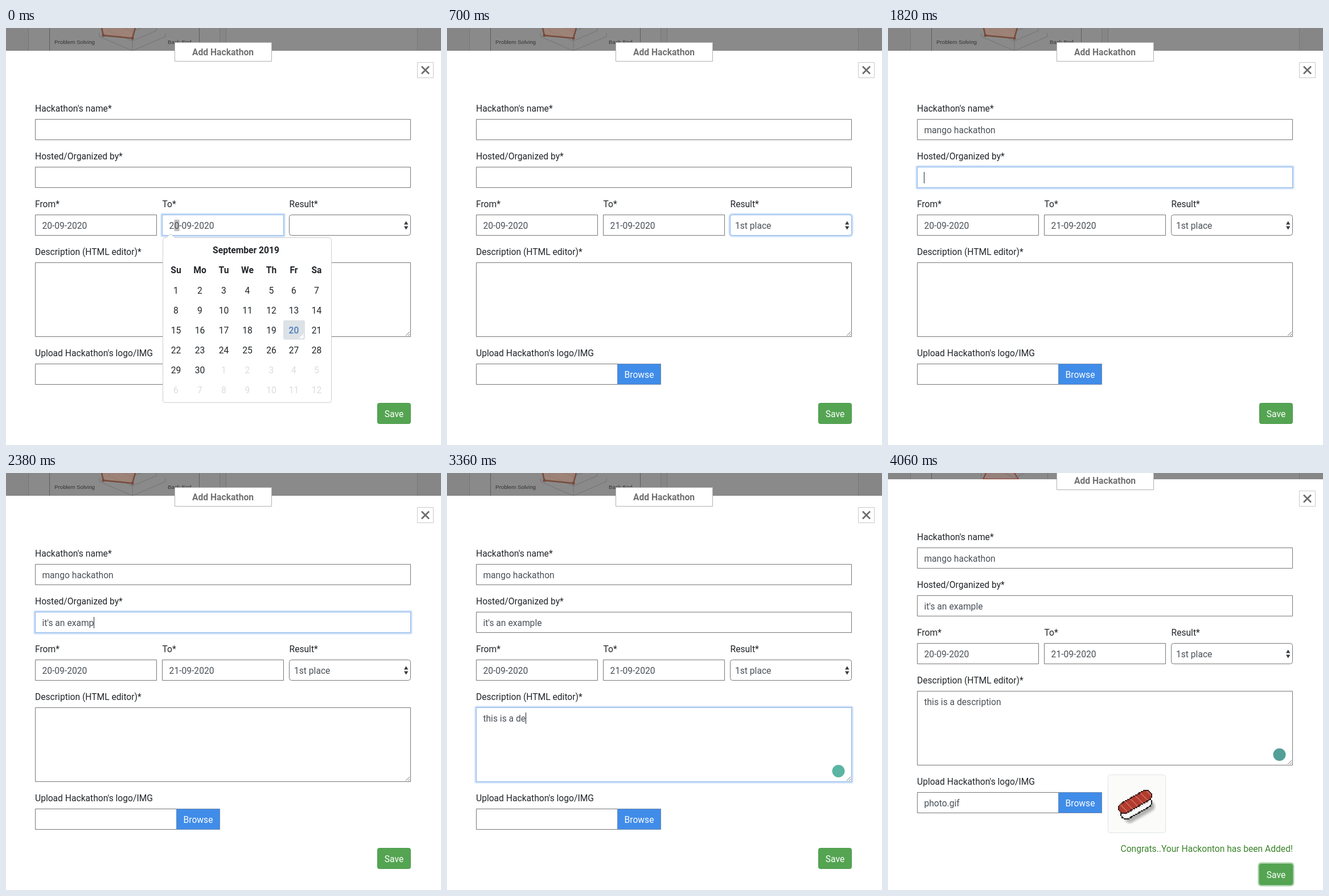
Animation of 764x733 px, one loop 4.54 s. Source, as an HTML page with a canvas:

```html
<!DOCTYPE html>
<html lang="en">
<head>
<meta charset="utf-8">
<title>Add Hackathon</title>
<style>
  html, body { margin: 0; width: 100%; height: 100%; overflow: hidden; background: #fff; }
  canvas { display: block; }
</style>
</head>
<body>
<canvas id="stage" width="764" height="733"></canvas>
<script>
const ctx = document.getElementById('stage').getContext('2d');
const LOOP = 4540, STEP = 140;
const INK = '#212529', MUTED = '#495057', BORDER = '#777';
const FONT = '15.63px Roboto, sans-serif', BOLD = '700 ' + FONT;

// y is the vertical middle of the capitals
function text(str, x, y, color = INK, align = 'left', font = FONT) {
  ctx.font = font;
  ctx.textAlign = align;
  ctx.fillStyle = color;
  ctx.fillText(str, x, y + 5.6);
}

function box(x, y, w, h, fill, stroke, radius = 0) {
  ctx.beginPath();
  ctx.roundRect(x + .5, y + .5, w - 1, h - 1, radius);
  if (fill) { ctx.fillStyle = fill; ctx.fill(); }
  if (stroke) { ctx.strokeStyle = stroke; ctx.lineWidth = 1; ctx.stroke(); }
}

function path(points, stroke, width = 1, fill) {
  ctx.beginPath();
  for (let i = 0; i < points.length; i += 2) ctx.lineTo(points[i], points[i + 1]);
  if (fill) { ctx.fillStyle = fill; ctx.fill(); }
  if (stroke) { ctx.strokeStyle = stroke; ctx.lineWidth = width; ctx.stroke(); }
}

function dot(x, y, r, color) {
  ctx.beginPath();
  ctx.arc(x, y, r, 0, 7);
  ctx.fillStyle = color;
  ctx.fill();
}

function field(x, y, w, h, focused, radius = 0) {
  if (focused) box(x - 3, y - 3, w + 6, h + 6, '#cbdff9', null, radius + 3);
  box(x, y, w, h, '#fff', focused ? '#8bb5e8' : BORDER, radius);
}

function input(x, y, w, h, value, focused, caret) {
  field(x, y, w, h, focused);
  text(value, x + 12.4, y + 19, MUTED);
  if (caret) {
    ctx.fillStyle = INK;
    ctx.fillRect(Math.round(x + 12.4 + ctx.measureText(value).width), y + 9, 1, 20);
  }
}

function backdrop(saved) {
  ctx.fillStyle = '#868686';
  ctx.fillRect(0, 0, 764, 41);
  for (const x of [39, 386]) box(x, -5, 337, 60, '#8a8a8a', '#767676');
  path([76.5, 0, 76.5, 41], '#5c5c5c');
  path([339.5, 0, 339.5, 41], '#5c5c5c');
  const web = '#737373';
  if (saved) {
    path([163.5, 0, 163.5, 11], web);
    path([280.5, 0, 280.5, 11], web);
    path([172, 0, 167, 11, 229, 11, 222, 0], '#8f4038', 2, '#95807b');
    path([205, 0, 222, 9, 240, 0], web);
    return;
  }
  for (const k of [1, .72, .45]) {
    path([222 - 58 * k, -21 + 30 * k, 222 - 58 * k, -21 + 36 * k, 222, -21 + 61 * k,
          222 + 58 * k, -21 + 36 * k, 222 + 58 * k, -21 + 30 * k], web);
  }
  path([222, 0, 222, 40], web);
  path([168, 0, 171, 13, 222, 18, 227, 0], '#764b3c', 2.5, 'rgba(170,125,108,.6)');
  dot(171, 13, 2.6, '#764b3c');
  dot(222, 18, 2.6, '#764b3c');
  const small = '9.75px "Liberation Sans", Arial, sans-serif';
  text('Problem Solving', 85, 22, '#333', 'left', small);
  text('Back End', 284, 22, '#333', 'left', small);
}

function calendar(day) {
  path([281, 368.5, 289, 362, 297, 368.5], '#ccc', 1, '#fff');
  box(275, 368, 297, 291, '#fff', '#cfcfcf', 4);
  path([282, 369, 296, 369], '#fff', 2);
  text('September 2019', 421.5, 390.5, INK, 'center', BOLD);
  const columns = [298.5, 340.5, 382.5, 424, 466, 505.5, 545.5];
  'Su Mo Tu We Th Fr Sa'.split(' ').forEach((name, i) =>
    text(name, columns[i], 425.5, INK, 'center', BOLD));
  for (let i = 0; i < 42; i++) {
    const x = columns[i % 7], y = 461 + 35.15 * Math.floor(i / 7), n = i + 1;
    if (n === day) {
      box(x - 19, y - 18, 39, 35, '#dde2e7', null, 3);
      path([x + 17, y + 6, x + 17, y + 14, x + 9, y + 14], null, 1, '#fff');
    }
    text(n > 30 ? n - 30 : n, x, y, n > 30 ? '#dcdcdc' : n === day ? '#4d7dbb' : INK,
      'center', n === day ? '500 ' + FONT : FONT);
  }
}

// Signed distance to a tilted capsule
function capsule(x, y, cx, cy, half, r) {
  const c = Math.cos(.52), s = Math.sin(.52), dx = x - cx, dy = y - cy;
  const along = dx * c - dy * s, across = dx * s + dy * c;
  return Math.hypot(Math.max(0, Math.abs(along) - half), across) - r;
}

function thumbnail() {
  box(386, 559, 102, 103, '#fbfcfa', '#dee2e6', 4);
  for (let y = 580; y < 650; y += 2) for (let x = 400; x < 476; x += 2) {
    const fish = capsule(x, y, 433, 606, 22, 10.5);
    const rice = capsule(x, y, 435, 617, 20, 10.5);
    const shade = capsule(x, y, 441, 624, 20, 12);
    const stripe = (x - y + 400) % 14 < 2;
    ctx.fillStyle =
      fish < 0 ? (fish > -2 ? '#3a1d1a' : stripe ? '#cf7565' : '#b23b2e') :
      rice < 0 ? (rice > -2 ? '#222' : (x * 7 + y * 3) % 22 < 3 ? '#dcdcdc' : '#fafafa') :
      shade < 0 ? `rgba(90,90,90,${Math.min(.45, -shade / 14)})` : 'transparent';
    ctx.fillRect(x, y, 2, 2);
  }
}

function saveButton(y, focused) {
  if (focused) box(649, y - 3, 65, 43, '#a5d0a3', null, 6);
  box(652, y, 59, 37, '#54a452', '#4b9a4b', 3);
  text('Save', 681.5, y + 19, '#fff', 'center');
}

function draw(time) {
  const t = Math.floor(time / STEP) * STEP;
  const typed = (str, start, pace) => str.slice(0, Math.max(0, Math.floor((t - start) / pace)));
  const focusSteps = [[0, 'to'], [420, 'result'], [980, 'name'], [1820, 'host'], [2660, 'to'],
    [2800, 'result'], [2940, 'about'], [3920, ''], [4060, 'save']];
  const focus = focusSteps.filter(([at]) => t >= at).pop()[1];
  const picked = t >= 3920, saved = t >= 4060;

  backdrop(saved);
  ctx.save();
  if (saved) ctx.translate(0, -29);
  ctx.fillStyle = '#fff';
  ctx.fillRect(0, 40, 764, 733);
  box(296, 25, 171, 34, '#fff', '#b0b0b0');
  text('Add Hackathon', 381, 42.5, '#707070', 'center', BOLD);
  box(722, 60, 29, 28, '#fff', '#c8c8c8');
  path([730, 67.5, 743, 80.5], '#6c6c6c', 2.6);
  path([743, 67.5, 730, 80.5], '#6c6c6c', 2.6);

  text("Hackathon's name*", 51, 141);
  input(51, 160, 660, 37, typed('mango hackathon', 980, 43), focus === 'name', focus === 'name');
  text('Hosted/Organized by*', 51, 225);
  input(51, 244, 660, 37, typed("it's an example", 1820, 43), focus === 'host', focus === 'host');

  text('From*', 51, 309);
  input(51, 328, 214, 37, '20-09-2020', false);
  text('To*', 274.5, 309);
  field(274, 328, 214, 37, focus === 'to');
  if (t < 140) {
    ctx.fillStyle = '#bdbdbd';
    ctx.fillRect(295.5, 337, 9, 20);
  }
  text(t < 140 ? '20-09-2020' : '21-09-2020', 286.6, 347, MUTED);

  text('Result*', 497.5, 309);
  field(497, 328, 214, 37, focus === 'result', 4);
  if (t >= 560) text('1st place', 506, 347, MUTED);
  path([699, 345.5, 702.7, 339.5, 706.4, 345.5], null, 1, '#343a40');
  path([699, 348.5, 702.7, 354.5, 706.4, 348.5], null, 1, '#343a40');

  text('Description (HTML editor)*', 51, 393);
  input(51, 412, 660, 131, typed('this is a description', 2940, 33), focus === 'about', focus === 'about');
  path([702, 541, 709, 534], '#777');
  path([706, 541, 709, 538], '#777');
  if (t >= 2940) dot(687.5, 524, 11, saved ? '#529f97' : '#5bb5a2');

  text("Upload Hackathon's logo/IMG", 51, 571);
  input(51, 590, 249, 37, picked ? 'photo.gif' : '', false);
  box(299, 590, 77, 37, '#408ce9', '#6f8cae');
  text('Browse', 337.5, 609, '#fff', 'center');
  if (picked) thumbnail();
  if (saved) text('Congrats..Your Hackonton has been Added!', 711, 689, '#3b832b', 'right');
  saveButton(saved ? 716 : picked ? 677 : 659, focus === 'save');
  if (t < 420) calendar(t < 140 ? 20 : 21);
  ctx.restore();
}

function tick() {
  draw(performance.now() % LOOP);
  requestAnimationFrame(tick);
}
tick();
</script>
</body>
</html>
```
